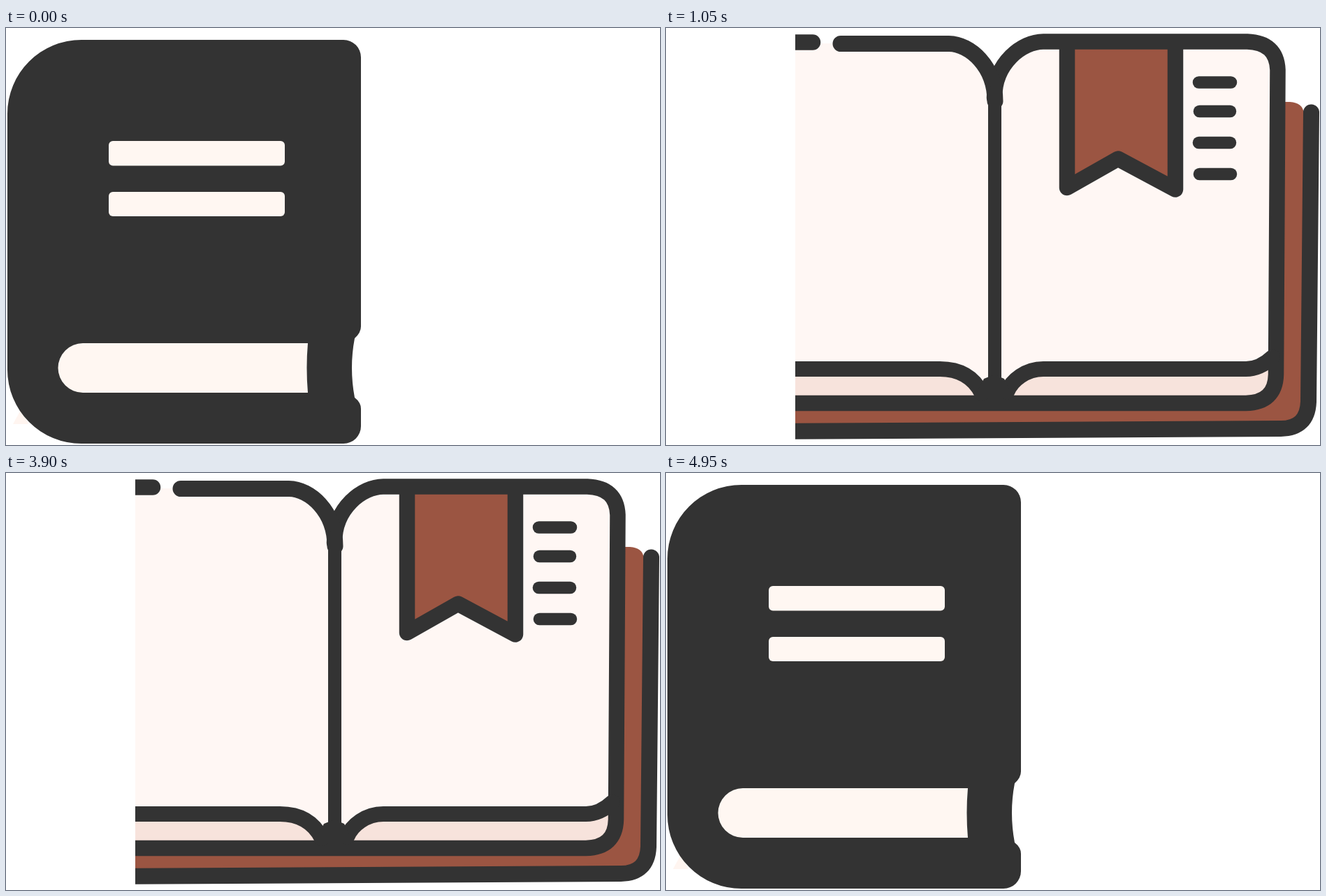
Write an HTML page with a canvas that moves like this. It is 936 by 598 pixels and loops after 5100 ms.

```html
<!DOCTYPE html>
<html lang="en">
<head>
<meta charset="utf-8">
<title>Opening book</title>
<style>
  html, body { margin: 0; width: 100%; height: 100%; overflow: hidden; background: #fff; }
  canvas { display: block; width: 936px; height: 598px; }
</style>
</head>
<body>
<canvas id="stage" width="936" height="598"></canvas>
<script>
const ctx = document.getElementById('stage').getContext('2d');
const STEP = 150, STEPS = 34;
const INK = '#333333', STRIP = '#f7e3dc';
let paper, leather;

function fill(path, color) {
  ctx.fillStyle = color;
  ctx.fill(new Path2D(path));
}

function stroke(path, width) {
  ctx.strokeStyle = INK;
  ctx.lineWidth = width;
  ctx.stroke(new Path2D(path));
}

function roundBox(x, y, w, h, r, color) {
  ctx.fillStyle = color;
  ctx.beginPath();
  ctx.roundRect(x, y, w, h, r);
  ctx.fill();
}

function dash(x1, x2, y) {
  stroke(`M${x1 + 8.5} ${y}H${x2 - 8.5}`, 17.5);
}

const leftRows = [
  () => dash(131, 395, 107),
  () => dash(131, 395, 160),
  () => dash(131, 395, 216),
  () => { dash(130, 194, 276); dash(238, 300, 275); dash(326, 388, 275); },
  () => dash(131, 395, 332.5),
  () => dash(131, 395, 388.5),
  () => dash(223, 295, 446)
];

function drawOpenBook(rows) {
  // Cover
  fill('M24 124Q27 106 43 106H893Q911 107 913 122L910 540Q905 570 880 574L149 580H115L45 574Q13 570 14 540Z', leather);
  stroke('M15.5 123.5L12.5 538Q14 574 48 574.5H103', 23);
  stroke('M149 578.5L880 574.5Q918 574 919.5 536L923.5 121', 23);

  // Pages
  fill('M105 22H403C437 23 471 55 471 105C470 50 510 20 540 20H830Q875 20 875 60L873 500Q872 538 830 538H105Q62 535 62 500L65 65Q65 22 105 22Z', paper);
  fill('M66 476Q80 489 105 489H392C420 489 440 500 452 538H110Q62 535 62 500Z', STRIP);
  fill('M488 538C495 505 515 489 540 489H830Q850 489 870 474L873 500Q872 538 830 538Z', STRIP);

  // Ribbon
  fill('M574 25H728.5V232L647 187.5L574 230Z', leather);
  stroke('M574 25V229L647 187.5L729 231.5V25', 22.5);

  // Outlines
  stroke('M210 20.5H105Q65 22 65 65L62 500Q66 538 105 538H830Q872 537 873 497L875.5 60Q874 21 832 19.5H540C510 19.5 470 50 470 100', 22.5);
  stroke('M250 22.5H405C435 23 471 55 471 105', 23);
  stroke('M470.5 90V510', 19);
  stroke('M66 472Q80 489 105 489H392C420 489 440 500 452 524', 22);
  stroke('M488 522C495 505 515 489 540 489H830Q850 489 868 472', 22);
  fill('M441 530L455 503L470 497L484 503L497 530Z', INK);

  dash(754, 817, 78);
  dash(755, 816, 119.5);
  dash(754, 816, 164.5);
  dash(755, 817, 209.5);
  leftRows.slice(0, rows).forEach(row => row());
}

function drawClosedBook() {
  fill('M22 546L10 568H32Z', '#fff5f0');
  fill('M108 17H483A25 25 0 0 1 508 42V428Q508 437 499 445Q491 487 499 530Q508 537 508 546V571A25 25 0 0 1 483 596H108A106 106 0 0 1 2 490V123A106 106 0 0 1 108 17Z', INK);
  roundBox(147, 162, 252, 35.5, 6, paper);
  roundBox(147, 235, 252, 35, 6, paper);
  fill('M432 452H110A35.5 35.5 0 0 0 110 523H432Q429 487 432 452Z', paper);
}

// The front cover swings towards the viewer around its hinge at x = 228.
function drawCover(width, tilt) {
  const at = (u, y) => `${228 + width * u} ${y + u * tilt * (y - 170) * 0.12}`;
  fill(`M228 500V60Q${at(0, 17)} ${at(0.08, 17)}L${at(1, 17)}L${228 + width + 2 * tilt} 487L${228 + width} 500Z`, INK);
  for (const [top, bottom] of [[158, 196], [237, 274]]) {
    fill(`M${at(0.22, top)}L${at(0.76, top)}L${at(0.76, bottom)}L${at(0.22, bottom)}Z`, paper);
  }
}

function drawSwing(k) {
  const corner = 26 * (4 - k);
  ctx.save();
  ctx.translate(56 * (k - 4), 0);
  ctx.beginPath();
  ctx.rect(228, 0, 720, 598);
  ctx.clip();

  ctx.save();
  ctx.translate(-219, 8);
  drawOpenBook(0);
  ctx.restore();

  fill(`M228 497H648V472L713 470V502Q715 535 719 554Q728 560 728 571V597H${228 + corner}Q228 597 228 ${597 - corner}Z`, INK);
  drawCover(506 * Math.cos(k * 83 / 4 * Math.PI / 180), k / 4);
  fill('M267 497Q281 508 300 508L600 507Q630 504 646 499Q645 525 648 548L300 547Q266 542 266 508Z', paper);
  ctx.restore();
}

function drawUnfold(k) {
  const shift = Math.min(0, 73 * (k - 7));
  const left = k >= 9 ? 0 : 469 + shift - 94.7 * (k - 4);
  const rows = k < 10 ? 0 : Math.min(7, (k - 9) * 2);
  ctx.save();
  ctx.beginPath();
  ctx.rect(Math.round(left), 0, 936, 598);
  ctx.clip();
  ctx.translate(shift, -shift * 8 / 219);
  drawOpenBook(rows);
  ctx.restore();
}

function draw(now) {
  const step = Math.floor(now / STEP) % STEPS;
  const k = Math.min(step, STEPS - 1 - step);
  paper = k <= 4 ? '#fff7f2' : '#fff7f4';
  leather = k <= 4 ? '#935441' : '#9b5542';
  ctx.lineCap = ctx.lineJoin = 'round';
  ctx.fillStyle = '#fff';
  ctx.fillRect(0, 0, 936, 598);
  if (k === 0) drawClosedBook();
  else if (k <= 4) drawSwing(k);
  else drawUnfold(k);
}

let start;
function tick(now) {
  start ??= now;
  draw(now - start);
  requestAnimationFrame(tick);
}
draw(0);
requestAnimationFrame(tick);
</script>
</body>
</html>
```
